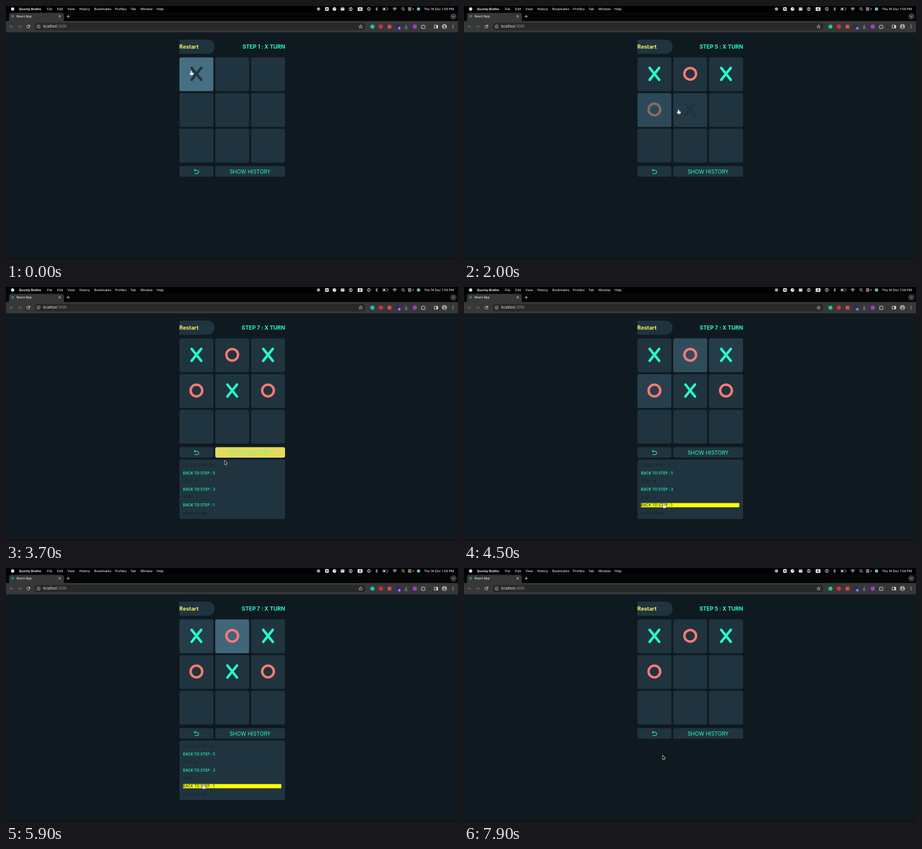
Animation of 750x421 px, one loop 8 s. Source, as an HTML page with a canvas:

```html
<!DOCTYPE html>
<html lang="en">
<head>
<meta charset="utf-8">
<title>React App</title>
<style>
html, body { margin: 0; width: 100%; height: 100%; overflow: hidden; background: #0f1a20; }
canvas { display: block; width: 750px; height: 421px; }
</style>
</head>
<body>
<canvas id="stage"></canvas>
<script>
const W = 750, H = 421, LOOP = 8000, FADE = 300;
const canvas = document.getElementById('stage');
const ctx = canvas.getContext('2d');
const scale = window.devicePixelRatio || 1;
canvas.width = W * scale;
canvas.height = H * scale;

const BASE = [32, 52, 63], LIT = [70, 111, 132];
const TEAL = [40, 252, 200], CORAL = [253, 122, 117], GRAY = [94, 99, 99];
const YELLOW = [250, 238, 94];

const clicks = [250, 720, 1150, 1800, 2200, 2750];
const OPEN = 3480, BACK = 7600;

// time, x, y of the pointer's hot spot
const path = [
  [0, 307, 107.5], [250, 309, 109], [560, 372, 110], [760, 376, 111],
  [1020, 428, 111], [1300, 443.5, 111], [1440, 438, 119], [1700, 321, 171],
  [1850, 318, 172], [2080, 370, 172], [2230, 376, 172], [2450, 430, 171],
  [2600, 433, 171.5], [2850, 434, 174], [3250, 402, 274], [3500, 394, 276],
  [3660, 372, 282], [3700, 362.5, 289], [4000, 345, 309], [4200, 338, 334],
  [4400, 332, 360], [4600, 331, 360.5], [4850, 333, 333.5], [5300, 333, 333.5],
  [5500, 329, 373.5], [5635, 328, 373.5], [5670, 328, 361], [5900, 327.5, 360],
  [6200, 328, 373.5], [6550, 330, 374], [6900, 331, 347], [7150, 332, 334],
  [7620, 332, 334], [7850, 329.5, 312], [8000, 329.5, 312]
];

const clamp = v => Math.max(0, Math.min(1, v));
const mix = (a, b, p) => a.map((v, i) => v + (b[i] - v) * p);
const rgb = c => `rgb(${c.map(Math.round).join(',')})`;
const cellX = i => 287.8 + (i % 3) * 59.4;
const cellY = i => 85.5 + Math.floor(i / 3) * 59.4;
const SIZE = 56.3;
const rowY = r => 296.6 + r * 13.3;

function pointer(t) {
  let i = 1;
  while (i < path.length - 1 && path[i][0] < t) i++;
  const [t0, x0, y0] = path[i - 1], [t1, x1, y1] = path[i];
  const p = clamp((t - t0) / (t1 - t0)), e = p * p * (3 - 2 * p);
  return [x0 + (x1 - x0) * e, y0 + (y1 - y0) * e];
}

const isOpen = t => t >= OPEN && t < BACK;
const moves = t => t >= BACK ? 4 : clicks.filter(c => c <= t).length;

function hover(t) {
  const [x, y] = pointer(t), hit = { cell: -1, row: -1, button: '' };
  for (let i = moves(t); i < 9; i++) {
    const dx = x - cellX(i), dy = y - cellY(i);
    if (dx >= 0 && dx <= SIZE && dy >= 0 && dy <= SIZE) hit.cell = i;
  }
  if (y > 266.5 && y < 284 && x > 288 && x < 463) hit.button = x < 344 ? 'undo' : x > 347 ? 'history' : '';
  if (isOpen(t) && x > 294 && x < 457) {
    const r = Math.round((y - 296.6) / 13.3);
    if (r >= 0 && r < 7 && Math.abs(y - rowY(r)) < 4) hit.row = r;
  }
  return hit;
}

// Share of the last FADE ms during which each part was hovered
function glow(t) {
  const out = { cells: Array(9).fill(0), history: 0, undo: 0 }, n = 20;
  for (let k = 0; k < n; k++) {
    const h = hover(Math.max(0, t - (k + 0.5) * FADE / n));
    const cell = h.row > 0 ? 6 - h.row : h.cell;
    if (cell >= 0) out.cells[cell] += 1 / n;
    if (h.button) out[h.button] += 1 / n;
  }
  return out;
}

function box(x, y, w, h, r, fill) {
  ctx.fillStyle = fill;
  ctx.beginPath();
  ctx.roundRect(x, y, w, h, r);
  ctx.fill();
}
function disc(x, y, r, fill) {
  ctx.fillStyle = fill;
  ctx.beginPath();
  ctx.arc(x, y, r, 0, 7);
  ctx.fill();
}
function ring(x, y, r, color, w = 0.8) {
  ctx.strokeStyle = color;
  ctx.lineWidth = w;
  ctx.beginPath();
  ctx.arc(x, y, r, 0, 7);
  ctx.stroke();
}
function line(d, color, w = 0.8, x = 0, y = 0) {
  ctx.save();
  ctx.translate(x, y);
  ctx.strokeStyle = color;
  ctx.lineWidth = w;
  ctx.lineCap = ctx.lineJoin = 'round';
  ctx.stroke(new Path2D(d));
  ctx.restore();
}
function text(s, x, y, size, color, weight = 400, align = 'left') {
  ctx.font = `${weight} ${size}px Inter, Roboto, sans-serif`;
  ctx.textAlign = align;
  ctx.textBaseline = 'alphabetic';
  ctx.fillStyle = color;
  ctx.fillText(s, x, y + size * 0.36);
}

function menuBar() {
  box(0, 0, W, 11, 0, '#000');
  const c = '#e6e6e6';
  disc(11, 5, 2.7, c);
  text('Quonly Brathe', 21.5, 5, 5.3, c, 700);
  [['File', 68], ['Edit', 85], ['View', 102], ['History', 121.5], ['Bookmarks', 146.5], ['Profiles', 181],
    ['Tab', 206.5], ['Window', 223], ['Help', 250]].forEach(([s, x]) => text(s, x, 5, 5.25, c, 500));
  ring(518.5, 5, 2.4, c);
  disc(518.5, 5, 1.4, c);
  box(529.5, 2, 6, 6, 1, c);
  disc(532.5, 5, 1.3, '#222');
  disc(545, 5, 3, c);
  line('M545 5L547 3', '#222');
  box(555.5, 2.4, 6, 5.2, 0.6, c);
  line('M556 4.2H561', '#333', 0.5);
  ring(572, 5, 2.7, c);
  disc(572, 4.2, 1, c);
  line('M570.4 6.8Q572 5.4 573.6 6.8', c);
  box(583.5, 2, 8, 6.2, 1, c);
  text('A', 587.5, 5, 5, '#111', 600, 'center');
  ring(602, 5, 2.6, c);
  line('M602 3.5V6.5', c);
  line('M613.3 3.5L616.7 6.5L615 8V2L616.7 3.5L613.3 6.5', c, 0.6);
  line('M625.5 3H633V7H625.5ZM634.2 4.5V5.5', '#aaa', 0.6);
  box(626.2, 3.7, 3, 2.6, 0.3, c);
  line('M642 4Q645 1.4 648 4M643.2 5.4Q645 3.8 646.8 5.4', c, 1);
  disc(645, 7, 0.8, c);
  ring(658.5, 4.5, 1.9, c);
  line('M660 6L661.5 7.5', c);
  line('M667.5 3.5H672M667.5 6.5H672', c, 1.5);
  disc(675.5, 5, 1.1, '#ff9d2e');
  disc(684.5, 5, 2.8, '#6fb6c6');
  text('Thu 14 Dec', 693.5, 5, 5.25, c, 500);
  text('1:56 PM', 743, 5, 5.25, c, 500, 'right');
}

function browser() {
  box(0, 10, W, 16, 0, '#050606');
  box(5, 11.5, 91, 18, 4, '#363737');
  box(0, 25, W, 18.7, 0, '#363737');
  disc(11, 17.2, 2.4, '#29798a');
  text('React App', 17.5, 17.2, 5.1, '#e4e4e4', 500);
  line('M87.6 15.7L90.6 18.7M90.6 15.7L87.6 18.7', '#ddd', 0.8);
  line('M101 17.3H105.4M103.2 15.1V19.5', '#ddd', 0.8);
  disc(742.3, 17.2, 5.3, '#343536');
  line('M740.7 16.6L742.3 18.2L743.9 16.6', '#ddd', 0.8);

  box(47.5, 28, 549, 12.5, 6.2, '#272828');
  line('M11.7 34.2H7M9 32L6.8 34.2L9 36.4', '#777', 0.8);
  line('M20.5 34.2H25.2M23.2 32L25.4 34.2L23.2 36.4', '#777', 0.8);
  line('M39.3 33.2A2.4 2.4 0 1 0 39.4 35M39.6 31.7V33.5H37.8', '#ddd', 0.9);
  ring(54, 34.2, 2.6, '#ccc', 0.7);
  line('M54 34V35.5M54 32.8V32.9', '#ccc', 0.7);
  text('localhost', 61.5, 34.2, 5.5, '#eee');
  const w = ctx.measureText('localhost').width;
  text(':3000', 61.5 + w, 34.2, 5.5, '#999');
  line('M588.5 31.4L589.3 33.3L591.4 33.5L589.8 34.9L590.3 37L588.5 35.9L586.7 37L587.2 34.9L585.6 33.5L587.7 33.3Z', '#ccc', 0.7);

  disc(608, 34.3, 3.4, '#25c39c');
  disc(622, 34.3, 3.5, '#d92e3b');
  box(633.2, 31.2, 6.2, 6.2, 1, '#dc4a4e');
  disc(650, 33.6, 3, '#30294f');
  box(649.5, 34.2, 6, 5.6, 1.2, '#4c2fc0');
  text('4', 652.5, 37, 4.6, '#fff', 600, 'center');
  line('M664 31.6V36M662.4 34.6L664 36.2L665.6 34.6M662 37.3H666', '#999', 0.9);
  disc(678.3, 34.2, 3.5, '#a638d6');
  line('M690 32.4H691.6A1 1 0 0 1 693.6 32.4H694.8V34A1 1 0 0 1 694.8 35.8V37.2H690Z', '#ddd', 0.9);
  line('M703 31.5V37', '#222', 0.8);
  line('M711 32H716.3V36.7H711Z', '#ddd', 0.9);
  box(714, 32, 2.3, 4.7, 0, '#ddd');
  disc(727.5, 34.2, 4, '#c5b9b2');
  disc(727.5, 33.2, 1.6, '#685b55');
  box(725, 35, 5, 2.4, 1.2, '#685b55');
  [32, 34.2, 36.4].forEach(y => disc(741.8, y, 0.65, '#ddd'));
}

function mark(i, color) {
  const x = cellX(i) + SIZE / 2, y = cellY(i) + SIZE / 2 - 0.8;
  if (i % 2) ring(x, y, 9.7, rgb(color), 4);
  else line('M-8 -10L8 10M8 -10L-8 10', rgb(color), 4.1, x, y);
}

function board(t, h, lit) {
  const n = moves(t);
  for (let i = 0; i < 9; i++) {
    box(cellX(i), cellY(i), SIZE, SIZE, 3, rgb(mix(BASE, LIT, lit.cells[i])));
    if (i < n) {
      const age = t - clicks[i];
      const start = mix(BASE, GRAY, clamp(age / 150));
      mark(i, mix(start, i % 2 ? CORAL : TEAL, clamp((age - 150) / 200)));
    }
  }
  if (h.cell >= 0) {
    const x = cellX(h.cell) + SIZE / 2, y = cellY(h.cell) + SIZE / 2;
    ctx.save();
    ctx.translate(x - cellX(n) - SIZE / 2, y - cellY(n) - SIZE / 2);
    mark(n, BASE);
    ctx.restore();
  }
}

function history(h) {
  box(287.8, 287, 175.2, 99, 3, rgb(BASE));
  for (let r = 0; r < 7; r++) {
    const k = 6 - r, live = k % 2 === 1, on = live && h.row === r;
    const label = k === 6 ? 'LATEST STEP : 6' : k === 0 ? 'START GAME' : (live ? 'BACK TO STEP : ' : 'STEP : ') + k;
    if (on) box(293.8, rowY(r) - 3.6, 163, 7.1, 0, '#ffff00');
    text(label, 293.8, rowY(r) - 0.1, 6.15, on ? rgb(BASE) : live ? rgb(TEAL) : '#14262f', 500);
  }
}

function cursor(t, h) {
  const [x, y] = pointer(t);
  const hand = h.cell >= 0 || h.button || (h.row >= 0 && h.row % 2);
  const shape = new Path2D(hand
    ? 'M-.9 .6Q0 -.4 .8 .6V3L3.3 3.6Q4 4 3.8 5L3.2 7.4H-.7L-2.7 4.8Q-2.6 3.8 -1.7 4.2L-.9 4.8Z'
    : 'M0 0V6.1L1.4 4.9L2.4 7L3.5 6.5L2.6 4.5H4.4Z');
  ctx.save();
  ctx.translate(x, y);
  ctx.lineJoin = 'round';
  ctx.lineWidth = hand ? 0.7 : 1.1;
  ctx.strokeStyle = hand ? '#111' : '#eee';
  ctx.stroke(shape);
  ctx.fillStyle = hand ? '#fff' : '#111';
  ctx.fill(shape);
  ctx.restore();
}

function draw(t) {
  ctx.setTransform(scale, 0, 0, scale, 0, 0);
  box(0, 0, W, H, 0, '#0f1a20');
  menuBar();
  browser();
  box(0, 420, W, 1, 0, '#060b0e');

  const h = hover(t), lit = glow(t), n = moves(t);
  box(287.8, 56, 58.4, 23.6, [0, 11.8, 11.8, 0], rgb(BASE));
  text('Restart', 287.6, 68, 9, rgb(YELLOW), 700);
  text(`STEP ${n + 1} : ${n % 2 ? 'O' : 'X'} TURN`, 463, 68, 9, rgb(TEAL), 700, 'right');
  board(t, h, lit);

  box(287.8, 266.5, 56.3, 17.5, 3, rgb(mix(BASE, YELLOW, lit.undo)));
  line('M314 271.4L312.3 273.3L314 275.2M312.5 273.3H317A2.7 2.7 0 0 1 317 278.9H313.4', rgb(TEAL), 1);
  box(347.2, 266.5, 115.8, 17.5, 3, rgb(mix(BASE, YELLOW, lit.history)));
  text('SHOW HISTORY', 405, 275.4, 8.8, rgb(mix(TEAL, [130, 242, 145], lit.history)), 400, 'center');
  if (isOpen(t)) history(h);
  cursor(t, h);
}

const begin = performance.now();
function tick() {
  draw((performance.now() - begin) % LOOP);
  requestAnimationFrame(tick);
}
tick();
</script>
</body>
</html>
```
